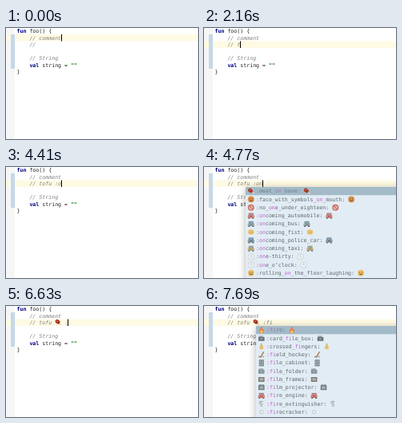
Write an HTML page with a canvas that moves like this. It is 240 px wide and 139 px high and loops after 8000 ms.

```html
<!DOCTYPE html>
<html lang="en">
<head>
<meta charset="utf-8">
<title>Emoji completion</title>
<style>
html, body { margin: 0; width: 100%; height: 100%; overflow: hidden; background: #fff; }
canvas { display: block; }
</style>
</head>
<body>
<canvas id="stage" width="240" height="139"></canvas>
<script>
const ctx = document.getElementById('stage').getContext('2d');
const W = 240, H = 139, LOOP = 8000;
const LEFT = 13.5, LINE = 8.5, ROW = 10.25, EMOJI_ADVANCE = 8.6;
const FONT = '6.6px "DejaVu Sans Mono", monospace';

const O_LIST = `o_button octopus oden office_building ogre oil_drum old_key
  old_man old_woman oncoming_automobile oncoming_bus`.split(/\s+/);
const ON_LIST = `meat_on_bone face_with_symbols_on_mouth no_one_under_eighteen
  oncoming_automobile oncoming_bus oncoming_fist oncoming_police_car oncoming_taxi
  one-thirty one_o’clock rolling_on_the_floor_laughing`.split(/\s+/);
const FI_LIST = `fire card_file_box crossed_fingers field_hockey file_cabinet file_folder
  film_frames film_projector fire_engine fire_extinguisher firecracker`.split(/\s+/);

const popup = (x, query, items) => ({ x, query, items });
const onPopup = popup(52, 'on', ON_LIST);
const oPopup = popup(52, 'o', O_LIST);

// time, active row, typed comment ("*" is the inserted emoji), caret shown, popup
const TIMELINE = [
  [0, 1, '', true],
  [630, 1, '', false],
  [960, 2, '', true],
  [1650, 2, '', false],
  [2160, 2, 't', true],
  [2250, 2, 'to', true],
  [2670, 2, 'tof', true],
  [2850, 2, 'tofu', true],
  [3450, 2, 'tofu ', true],
  [4080, 2, 'tofu :', true],
  [4410, 2, 'tofu :o', true],
  [4590, 2, 'tofu :o', true, oPopup],
  [4740, 2, 'tofu :on', true, oPopup],
  [4770, 2, 'tofu :on', true, onPopup],
  [5310, 2, 'tofu *', true],
  [5880, 2, 'tofu *', false],
  [5910, 2, 'tofu * ', true],
  [6630, 2, 'tofu * :', true],
  [7010, 2, 'tofu * :f', true],
  [7100, 2, 'tofu * :f', true, popup(65, 'f', null)],
  [7160, 2, 'tofu * :f', true, popup(65, 'f', FI_LIST)],
  [7220, 2, 'tofu * :fi', true, popup(65, 'fi', FI_LIST)],
  [7690, 2, 'tofu * :fi', false, popup(65, 'fi', FI_LIST)]
];

function box(color, x, y, w, h) {
  ctx.fillStyle = color;
  ctx.fillRect(x, y, w, h);
}

function oval(color, x, y, rx, ry = rx, turn = 0) {
  ctx.fillStyle = color;
  ctx.beginPath();
  ctx.ellipse(x, y, rx, ry, turn, 0, Math.PI * 2);
  ctx.fill();
}

function line(color, width, ...points) {
  ctx.strokeStyle = color;
  ctx.lineWidth = width;
  ctx.beginPath();
  points.forEach(([x, y]) => ctx.lineTo(x, y));
  ctx.stroke();
}

// Draws text and returns the x position after it.
function write(text, x, y, color, style = '') {
  ctx.font = `${style} ${FONT}`;
  ctx.fillStyle = color;
  ctx.fillText(text, x, y);
  return x + ctx.measureText(text).width;
}

function vehicle(color) {
  box(color, -3, -3.4, 6, 3);
  box('#8fa9b5', -2.2, -2.5, 4.4, 2);
  box(color, -4, -0.6, 8, 3.2);
  box('#59646b', -3.4, 2.4, 1.9, 1.3);
  box('#59646b', 1.5, 2.4, 1.9, 1.3);
  box('#e9dfbc', -3.2, 0.4, 1.3, 1);
  box('#e9dfbc', 1.9, 0.4, 1.3, 1);
}

function face(color) {
  oval(color, 0, 0, 4);
  oval('#76563c', -1.5, -0.9, 0.7);
  oval('#76563c', 1.5, -0.9, 0.7);
  box('#76563c', -1.8, 1, 3.6, 1.2);
}

function cabinet() {
  box('#6c7a84', -3, -4, 6, 8);
  [-3, 0.4].forEach(y => {
    box('#a9b4bb', -2.3, y, 4.6, 2.6);
    box('#59656d', -0.8, y + 0.8, 1.6, 0.8);
  });
}

function hand() {
  oval('#e8c070', 0, 1.3, 2.5, 2.5);
  line('#e8c070', 1.3, [-1.1, 0], [0.8, -3.8]);
  line('#dcae62', 1.3, [1.1, 0], [-0.8, -3.8]);
}

function meat() {
  line('#e6d5bd', 1.4, [0, 0], [3.1, 2.7]);
  oval('#e6d5bd', 3.1, 2.5, 0.9);
  oval('#a93622', -0.8, -0.8, 3.2, 2.4, 0.7);
  oval('#d9764e', -1.5, -1.5, 1.1, 0.7, 0.7);
}

function flame() {
  oval('#e8804c', 0, 1, 3);
  line('#e8804c', 2, [-0.8, 0], [0.4, -4]);
  oval('#f6cc66', 0, 2, 1.5, 1.7);
}

function clock() {
  oval('#c3cdd3', 0, 0, 4);
  oval('#f1f4f6', 0, 0, 3.2);
  line('#a3adb3', 0.8, [0, -2.2], [0, 0], [1.4, 1]);
}

function reel(color) {
  box(color, -3.8, -2.8, 7.6, 6);
  box('#aab3b5', -2.3, -1.5, 4.6, 3.2);
}

function fileBox(color) {
  box('#9aa5ac', -3.4, -3.2, 5.8, 2.4);
  box(color, -3.8, -1.6, 7.6, 4.8);
  box('#b9c2c7', -1.4, 0, 2.8, 1);
}

const EMOJI = [
  [/meat/, meat],
  [/symbols/, () => face('#dd9148')],
  [/no_one/, () => {
    oval('#cf6a60', 0, 0, 4);
    oval('#d9bdba', 0, 0, 2.6);
    line('#cf6a60', 1.2, [-2.6, -2.6], [2.6, 2.6]);
  }],
  [/automobile|fire_engine/, () => vehicle('#c96059')],
  [/police/, () => vehicle('#657d90')],
  [/bus/, () => vehicle('#7b909a')],
  [/taxi/, () => vehicle('#ad9b69')],
  [/fist/, () => {
    oval('#ebc36d', 0, 0, 3.8, 3.2);
    line('#cda055', 0.8, [-2.4, 0.4], [2.4, 0.4]);
  }],
  [/fingers/, hand],
  [/one-|clock/, clock],
  [/laughing|old_m|old_w/, () => face('#edc164')],
  [/extinguisher/, () => {
    box('#c0c6cb', -1.6, -1.8, 3.2, 5.4);
    line('#8d979d', 0.9, [-2.8, 0], [-2, -3], [1.8, -3]);
  }],
  [/cracker/, () => {
    oval('#c5cdd2', 0, 0, 2.6);
    oval('#eef2f5', 0, 0, 1.5);
  }],
  [/^fire$/, flame],
  [/file_box/, () => fileBox('#66727a')],
  [/folder/, () => fileBox('#87949c')],
  [/hockey/, () => {
    line('#a4764e', 1.4, [2.9, -3.8], [-1, 2.8], [-3.4, 2.2]);
    oval('#a9b5bb', 2, 2.4, 1.2);
  }],
  [/cabinet|building|drum/, cabinet],
  [/film_frames/, () => reel('#817b6e')],
  [/projector/, () => {
    reel('#707b82');
    oval('#7c878e', -1.7, -2.5, 1.6);
    oval('#7c878e', 1.8, -2.5, 1.6);
  }],
  [/./, () => oval('#c9837c', 0, 0, 3.8)]
];

function drawEmoji(name, x, y) {
  ctx.save();
  ctx.translate(x, y);
  EMOJI.find(([pattern]) => pattern.test(name))[1]();
  ctx.restore();
}

function drawEditor(row, typed, caret) {
  const baseline = n => 6.1 + n * LINE;
  const indent = LEFT + 4 * 3.97;
  const rowTop = row * LINE - 0.5;

  box('#fff', 0, 0, W, H);
  box('#f6f6f6', 0, 0, 11, H);
  box('#fffae3', 0, rowTop, W, LINE);
  box('#c4d8e9', 6, 8, 5, 43);

  const afterFun = write('fun', LEFT, baseline(0), '#000080', 'bold');
  write(' foo() {', afterFun, baseline(0), '#222');
  const commentEnd = write('// comment', indent, baseline(1), '#808080', 'italic');

  const [before, after] = typed.split('*');
  let x = write('// ' + before, indent, baseline(2), '#808080', 'italic');
  if (after !== undefined) {
    drawEmoji('meat', x + 4.2, 20.5);
    x = write(after, x + EMOJI_ADVANCE, baseline(2), '#808080', 'italic');
  }

  write('// String', indent, baseline(4), '#808080', 'italic');
  const afterVal = write('val', indent, baseline(5), '#000080', 'bold');
  const afterName = write(' string = ', afterVal, baseline(5), '#222');
  write('""', afterName, baseline(5), '#008000', 'bold');
  write('}', LEFT, baseline(6), '#222');

  if (caret) box('#000', Math.floor(row === 1 ? commentEnd : x), rowTop, 1, LINE);
}

function drawItem(name, index, x, query) {
  const selected = index === 0;
  const middle = 30.3 + index * ROW;
  const baseline = middle + 2.1;
  const plain = selected ? '#6b7f8b' : '#5f676d';
  const match = selected ? '#a86fb8' : '#c060cf';
  const at = name.indexOf(query);

  if (selected) box('#a3bac8', x, 25, W - x, ROW);
  drawEmoji(name, x + 6.8, middle);

  let end = write(':', x + 13, baseline, match);
  end = write(name.slice(0, at), end, baseline, plain);
  end = write(query, end, baseline, match);
  end = write(name.slice(at + query.length) + ':', end, baseline, plain);
  drawEmoji(name, end + 8, middle);
}

function drawPopup({ x, query, items }) {
  ctx.save();
  ctx.shadowColor = 'rgba(0, 0, 0, 0.3)';
  ctx.shadowBlur = 9;
  ctx.shadowOffsetY = 2;
  box(items ? '#e2ecf4' : '#ececec', x, 25, W, H);
  ctx.restore();
  if (items) items.forEach((name, index) => drawItem(name, index, x, query));
}

function render(now) {
  const time = now % LOOP;
  const [, row, typed, caret, list] = TIMELINE.findLast(([start]) => start <= time);
  drawEditor(row, typed, caret);
  if (list) drawPopup(list);
}

const begin = performance.now();
function tick() {
  render(performance.now() - begin);
  requestAnimationFrame(tick);
}
tick();
</script>
</body>
</html>
```
